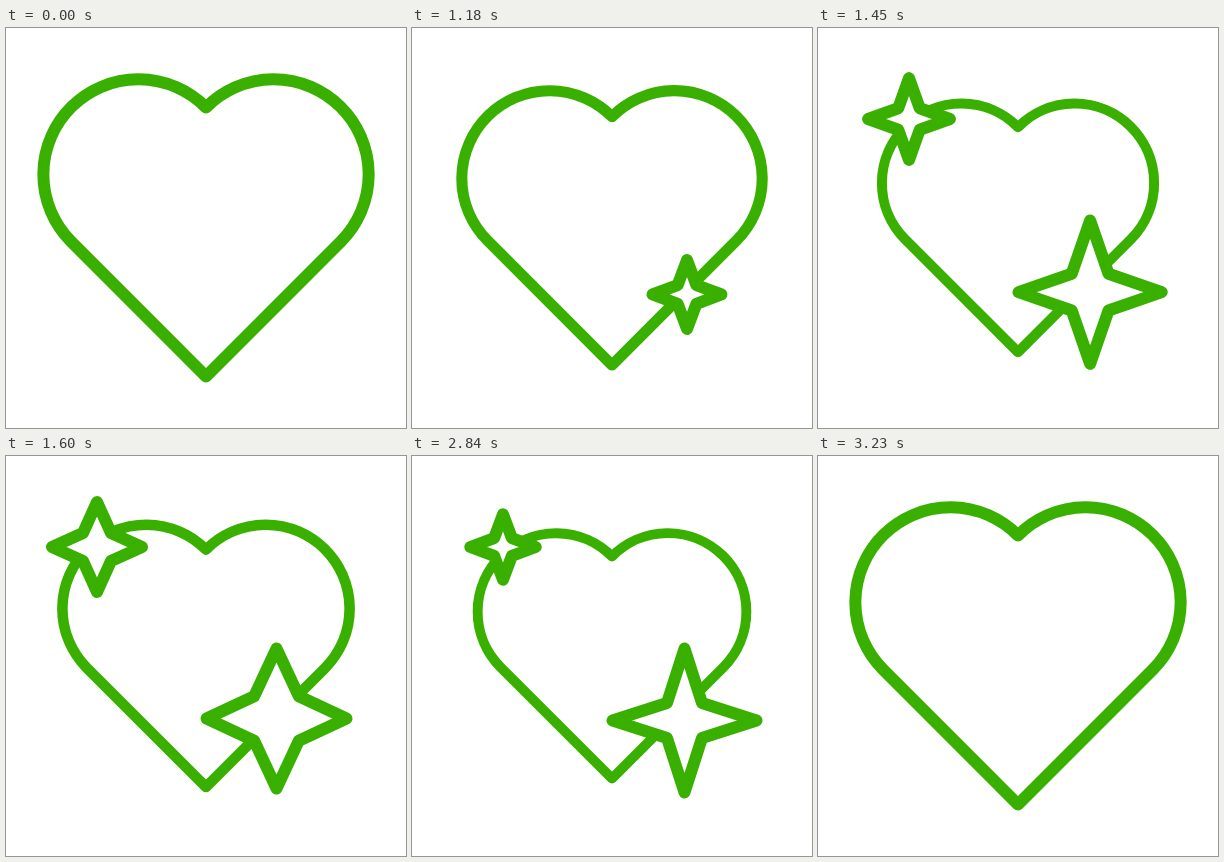
These frames come from a looping animation (400 by 400 pixels, 3.26 s). An HTML page:

```html
<!DOCTYPE html>
<html lang="en">
<head>
<meta charset="utf-8">
<title>Sparkling heart</title>
<style>
  html, body { margin: 0; width: 100%; height: 100%; overflow: hidden; background: #fff; }
  svg { display: block; width: 100%; height: 100%; }
  path { fill: #fff; stroke: #39b000; stroke-width: 12; stroke-linejoin: round; }
</style>
</head>
<body>
<svg viewBox="0 0 400 400">
  <path id="heart" d="M200 348.4 L64.8 213.2 A95 95 0 0 1 200 79.5 A95 95 0 0 1 335.2 213.2 Z"/>
  <path id="small"/>
  <path id="big"/>
</svg>
<script>
const LOOP = 3260, STEP = 30, STEPS = 20;
const OPEN_AT = 1000, CLOSE_AT = 2630;

const heart = document.getElementById('heart');

// Poses are [centre x, centre y, outer reach, inner reach].
const stars = [
  { node: document.getElementById('big'), times: [0, 13, 20],
    poses: [[277, 268, 5, 3], [272.5, 264.5, 72, 17.5], [270.5, 262.5, 70, 22.3]] },
  { node: document.getElementById('small'), times: [7, 16, 20],
    poses: [[91, 91, 5, 2.5], [91, 91, 42, 11], [91, 91, 45, 14]] }
];

const clamp = (value, low, high) => Math.min(high, Math.max(low, value));
const ease = x => (1 - Math.cos(Math.PI * clamp(x, 0, 1))) / 2;

function tween(step, [start, middle, end], [a, b, c]) {
  return step < middle
    ? a + (b - a) * ease((step - start) / (middle - start))
    : b + (c - b) * ease((step - middle) / (end - middle));
}

function starPath(x, y, outer, inner) {
  const points = [
    [0, -outer], [inner, -inner], [outer, 0], [inner, inner],
    [0, outer], [-inner, inner], [-outer, 0], [-inner, -inner]
  ];
  return 'M' + points.map(([dx, dy]) => `${x + dx} ${y + dy}`).join('L') + 'Z';
}

function stepAt(time) {
  const since = start => clamp(Math.floor((time - start) / STEP), 0, STEPS);
  return since(OPEN_AT) - since(CLOSE_AT);
}

function draw(time) {
  const step = stepAt(time % LOOP);
  const scale = tween(step, [0, 13, 20], [1, 0.826, 0.883]);
  heart.setAttribute('transform', `translate(200 200) scale(${scale}) translate(-200 -200)`);

  for (const { node, times, poses } of stars) {
    const pose = poses[0].map((_, i) => tween(step, times, poses.map(p => p[i])));
    node.setAttribute('d', starPath(...pose));
    node.style.display = step > times[0] ? '' : 'none';
  }
}

const begin = performance.now();
function tick() {
  draw(performance.now() - begin);
  requestAnimationFrame(tick);
}
tick();
</script>
</body>
</html>
```
